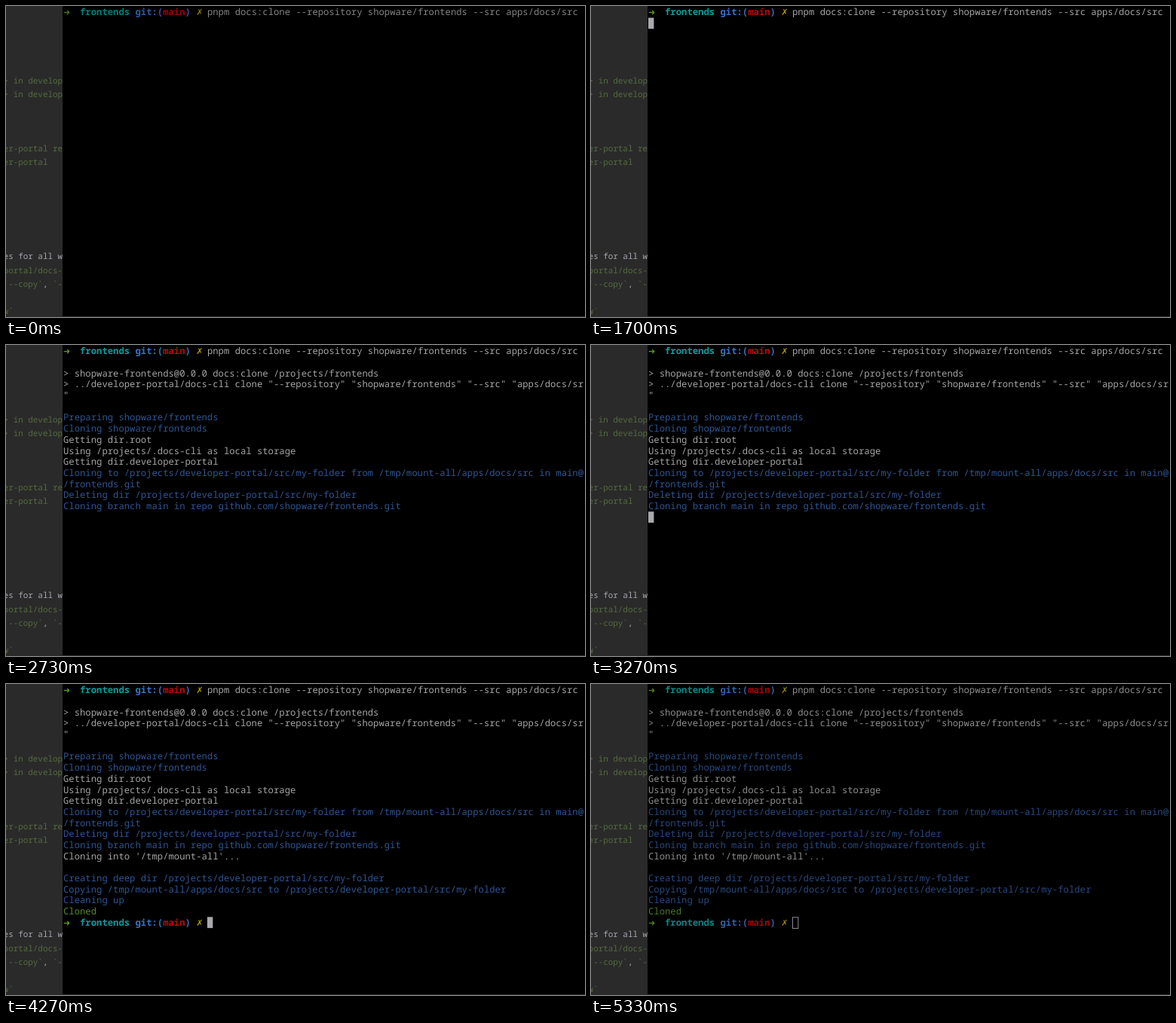
An HTML page that plays this animation: 768 px wide and 413 px high, repeating every 5360 ms.

```html
<!DOCTYPE html>
<html lang="en">
<head>
<meta charset="utf-8">
<title>Terminal: cloning docs</title>
<style>
  html, body { margin: 0; width: 100%; height: 100%; overflow: hidden; background: #000; }
  svg { display: block; width: 768px; height: 413px; }
  text { white-space: pre; text-rendering: geometricPrecision; font-variant-ligatures: none; }
  #editor text { font: 10.9px "Noto Sans Mono", monospace; }
  #terminal text { font: 12.24px "Noto Sans Mono", monospace; }
  #terminal text.bold { font-weight: 700; }
  #terminal text.symbol { font: 11px "DejaVu Sans", sans-serif; }
</style>
</head>
<body>
<svg viewBox="0 0 768 413">
  <rect width="768" height="413" fill="#2a2a2a"/>
  <g id="editor"></g>
  <rect x="75" width="693" height="412" fill="#000"/>
  <g id="terminal">
    <g id="command"></g>
    <g id="progress"></g>
    <g id="result"></g>
    <rect id="cursor" width="7.4" height="14.7"/>
  </g>
</svg>
<script>
const LOOP = 5360, ENTER = 1700, OUTPUT = 1930, DONE = 3600, BLUR = 5230, BLINK = 560;
const LEFT = 76, CELL = 7.344, LINE = 14.69;
const PLAIN = '#a4a4a4', BLUE = '#2f5594', GREEN = '#578a2a', BRANCH = '#3a73c4';
const CODE_GREEN = '#556b40', CODE_PLAIN = '#a5a5b2';

const byId = id => document.getElementById(id);
const clamp = v => Math.max(0, Math.min(1, v));

function addText(group, x, y, content, fill, className = '') {
  const node = document.createElementNS('http://www.w3.org/2000/svg', 'text');
  node.setAttribute('x', x);
  node.setAttribute('y', y);
  node.setAttribute('fill', fill);
  node.setAttribute('class', className);
  node.textContent = content;
  byId(group).append(node);
}

function print(group, row, col, content, fill, className) {
  addText(group, LEFT + col * CELL, 12.3 + row * LINE, content, fill, className);
}

function prompt(group, row) {
  print(group, row, 0, '➜', '#5c9a1c', 'symbol');
  print(group, row, 3, 'frontends', '#0f9c9c', 'bold');
  print(group, row, 13, 'git:(', BRANCH, 'bold');
  print(group, row, 18, 'main', '#c00808', 'bold');
  print(group, row, 22, ')', BRANCH, 'bold');
  print(group, row, 24, '✗', '#b09a0c', 'symbol');
}

function printLines(group, firstRow, lines) {
  lines.forEach(([content, fill], i) => print(group, firstRow + i, 0, content, fill));
}

const editorLine = (y, content, fill = CODE_GREEN, col = 0) =>
  addText('editor', -3.4 + col * 6.54, y + 3.6, content, fill);

editorLine(99, '> in develop');
editorLine(117, '> in develop');
editorLine(189, 'er-portal re');
editorLine(207, 'er-portal');
editorLine(332.5, 'es for all w', CODE_PLAIN);
editorLine(351, 'portal/docs-');
editorLine(369, '`--copy`');
editorLine(369, ',', CODE_PLAIN, 8);
editorLine(369, '`-', CODE_GREEN, 10);
editorLine(405, 'w`');

prompt('command', 0);
print('command', 0, 26, 'pnpm docs:clone --repository shopware/frontends --src apps/docs/src', PLAIN);

printLines('progress', 2, [
  ['> shopware-frontends@0.0.0 docs:clone /projects/frontends', PLAIN],
  ['> ../developer-portal/docs-cli clone "--repository" "shopware/frontends" "--src" "apps/docs/sr', PLAIN],
  ['"', PLAIN],
  ['', PLAIN],
  ['Preparing shopware/frontends', BLUE],
  ['Cloning shopware/frontends', BLUE],
  ['Getting dir.root', PLAIN],
  ['Using /projects/.docs-cli as local storage', PLAIN],
  ['Getting dir.developer-portal', PLAIN],
  ['Cloning to /projects/developer-portal/src/my-folder from /tmp/mount-all/apps/docs/src in main@', BLUE],
  ['/frontends.git', BLUE],
  ['Deleting dir /projects/developer-portal/src/my-folder', BLUE],
  ['Cloning branch main in repo github.com/shopware/frontends.git', BLUE]
]);

printLines('result', 15, [
  ["Cloning into '/tmp/mount-all'...", PLAIN],
  ['', PLAIN],
  ['Creating deep dir /projects/developer-portal/src/my-folder', BLUE],
  ['Copying /tmp/mount-all/apps/docs/src to /projects/developer-portal/src/my-folder', BLUE],
  ['Cleaning up', BLUE],
  ['Cloned', GREEN]
]);
prompt('result', 21);

function show(id, visible) {
  byId(id).style.visibility = visible ? 'visible' : 'hidden';
}

function drawCursor(t) {
  const [row, col] = t < OUTPUT ? [1, 0] : t < DONE ? [15, 0] : [21, 26];
  const blurred = t >= BLUR;
  const blinkOn = Math.floor((t - ENTER) / BLINK) % 2 === 0;
  const inset = blurred ? 0.5 : 0;
  const cursor = byId('cursor');
  cursor.setAttribute('x', LEFT + col * CELL + inset);
  cursor.setAttribute('y', 0.9 + row * LINE + inset);
  cursor.setAttribute('fill', blurred ? 'none' : '#a9a9ae');
  cursor.setAttribute('stroke', blurred ? '#a9a9ae' : 'none');
  show('cursor', t >= ENTER && (blurred || blinkOn));
}

const start = performance.now();

function render() {
  const t = (performance.now() - start) % LOOP;
  show('progress', t >= OUTPUT);
  show('result', t >= DONE);
  drawCursor(t);
  // The text brightens gently at the start and dims again near the end.
  const brightness = 0.8 + 0.2 * clamp(t / 1100) - 0.14 * clamp((t - 4670) / 660);
  byId('terminal').style.opacity = brightness;
  requestAnimationFrame(render);
}

render();
</script>
</body>
</html>
```
